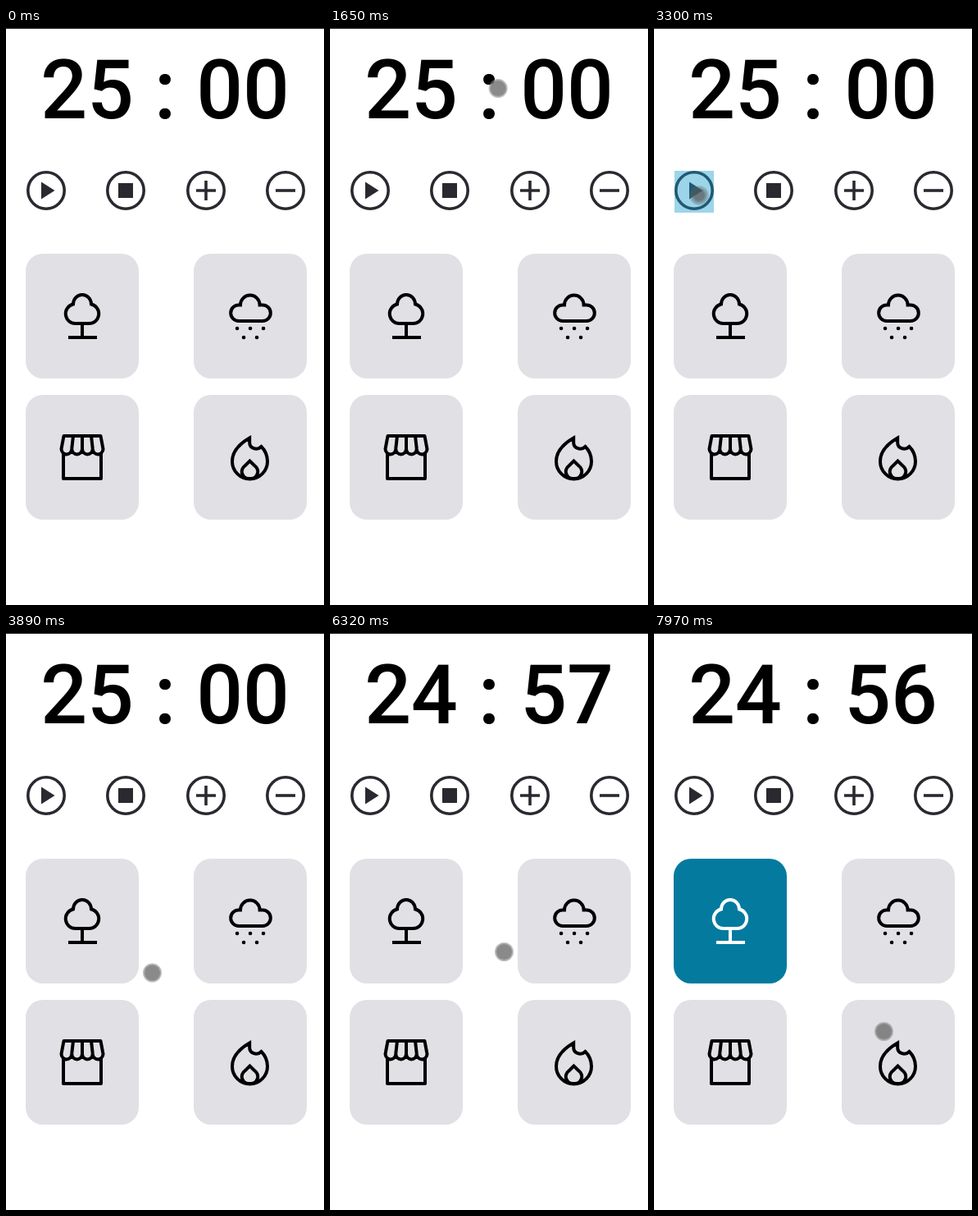
An HTML page that plays this animation: 388x703 px, repeating every 8000 ms.

```html
<!DOCTYPE html>
<html lang="en">
<head>
<meta charset="utf-8">
<title>Focus timer</title>
<style>
  html, body { margin: 0; width: 100%; height: 100%; overflow: hidden; background: #fff; }
  svg { display: block; width: 388px; height: 703px; }
  #clock { font: 500 100px Roboto, sans-serif; text-anchor: middle; white-space: pre; }
  .buttons { color: #2a2930; stroke: currentColor; stroke-width: 3.6; fill: none; }
  .buttons .solid { fill: currentColor; stroke: none; }
  .tile { color: #000; }
  .tile rect { fill: #e1e0e5; width: 138px; height: 152px; rx: 21px; }
  .tile.active { color: #fff; }
  .tile.active rect { fill: #047a9f; }
  .icon { fill: none; stroke: currentColor; stroke-width: 4; }
  .drops { stroke: currentColor; stroke-width: 4.5; stroke-linecap: round; }
  .tap { fill: #149bcd; fill-opacity: .42; }
</style>
</head>
<body>
<svg viewBox="0 0 388 703">
  <defs>
    <radialGradient id="press">
      <stop offset=".5" stop-color="#555" stop-opacity=".72"/>
      <stop offset="1" stop-color="#666" stop-opacity=".2"/>
    </radialGradient>
  </defs>
  <rect width="388" height="1" fill="#222"/>
  <text id="clock" x="194" y="110">25 : 00</text>

  <g class="buttons">
    <circle cx="49" cy="198" r="22.2"/>
    <path class="solid" d="M43 187.5L59.5 198L43 208.5Z"/>
    <circle cx="146" cy="198" r="22.2"/>
    <path class="solid" d="M137 189h18v18h-18Z"/>
    <circle cx="244" cy="198" r="22.2"/>
    <path d="M232 198h24M244 186v24"/>
    <circle cx="341" cy="198" r="22.2"/>
    <path d="M329 198h24"/>
  </g>

  <g class="tile" id="forest">
    <rect x="24" y="275"/>
    <path class="icon" d="M85 360a11.9 11.9 0 0 1-3-23.5a11 11.5 0 0 1 22 0a11.9 11.9 0 0 1-3 23.5ZM93 360v17M76 377h35"/>
  </g>
  <g class="tile">
    <rect x="229" y="275"/>
    <path class="icon" d="M284 357a9.8 9.8 0 0 1 0-19.6h2a11.8 11.8 0 0 1 23.6 0h3.4a9.8 9.8 0 0 1 0 19.6Z"/>
    <path class="drops" d="M282 366h.1M298 366h.1M314 366h.1M290 377h.1M306 377h.1"/>
  </g>
  <g class="tile">
    <rect x="24" y="447"/>
    <path class="icon" stroke-linejoin="round" d="M70 519V549H116V519M70.5 497H115.5L118.5 513a6.4 7 0 0 1-12.75 0a6.4 7 0 0 1-12.75 0a6.4 7 0 0 1-12.75 0a6.4 7 0 0 1-12.75 0ZM82 497L80.2 513M93 497v16M104 497l1.8 16"/>
  </g>
  <g class="tile">
    <rect x="229" y="447"/>
    <path class="icon" d="M297.2 499.5C286 506 276 516 276 528A21.5 21.5 0 0 0 319 528C319 521 316 514.5 311.5 510C306 515.5 297.2 512 297.2 505ZM297.5 527.5L291.5 533.4A8.6 8.6 0 0 0 297.5 549A8.6 8.6 0 0 0 303.5 533.4Z"/>
  </g>

  <rect class="tap" id="playTap" x="25" y="174" width="48" height="51"/>
  <rect class="tap" id="forestTap" x="24" y="275" width="138" height="152"/>
  <g id="pointer">
    <g id="hover">
      <circle r="10.5" fill="#6e6e6e" fill-opacity=".35" stroke="#8c8c8c" stroke-opacity=".55" stroke-width="2"/>
      <circle r="9.5" fill="#6e6e6e" fill-opacity=".7"/>
    </g>
    <circle id="pressed" r="12" fill="url(#press)"/>
  </g>
</svg>
<script>
const LOOP = 8000, REFRESH = 65.8;
const APPEAR = 800, TIMER_START = 3262, SECOND = 1005;
const $ = id => document.getElementById(id);

// Each move is a Bezier from where the pointer rests: start, end, controls, goal.
const HOME = [310, 664];
const moves = [
  [800, 1787, [55, 228], [193, 40], [221, 76]],
  [2116, 2510, [235, 76], [295, 125], [293, 150]],
  [2510, 3037, [255, 200], [60, 220], [55, 204]],
  [3432, 3826, [60, 235], [140, 385], [178.5, 414]],
  [4880, 5143, [185, 414], [206, 393], [212.5, 392.5]],
  [5340, 5932, [212.5, 392], [212.5, 390], [212.5, 388.5]],
  [6722, 7314, [200, 430], [140, 445], [121, 374]],
  [7774, 7972, [121, 380], [150, 460], [280.5, 485.5]]
];

const bezier = (a, b, c, d, u) => {
  const v = 1 - u;
  return v * v * v * a + 3 * v * v * u * b + 3 * v * u * u * c + u * u * u * d;
};

function pointerAt(time) {
  let from = HOME;
  for (const [start, end, c1, c2, to] of moves) {
    if (time < start) break;
    const u = Math.min(1, (time - start) / (end - start));
    from = [0, 1].map(i => bezier(from[i], c1[i], c2[i], to[i], u));
  }
  return from;
}

function clockText(time) {
  const left = 25 * 60 - Math.max(0, Math.floor((time - TIMER_START) / SECOND));
  const pad = n => String(n).padStart(2, "0");
  return `${pad(Math.floor(left / 60))} : ${pad(left % 60)}`;
}

const show = (id, visible) => $(id).setAttribute("visibility", visible ? "visible" : "hidden");

function render(t) {
  // The screen is refreshed about 15 times a second.
  const time = APPEAR + Math.floor((t - APPEAR + 12) / REFRESH) * REFRESH;
  $("clock").textContent = clockText(time);
  $("pointer").setAttribute("transform", `translate(${pointerAt(time)})`);

  const playTap = time > 3230 && time < 3430;
  const forestTap = time > 7440 && time < 7640;
  const pressed = playTap || forestTap;
  show("playTap", playTap);
  show("forestTap", forestTap);
  show("hover", time >= APPEAR && !pressed);
  show("pressed", pressed);
  $("forest").classList.toggle("active", time > 7560);
}

const begin = performance.now();
function frame() {
  render((performance.now() - begin) % LOOP);
  requestAnimationFrame(frame);
}
frame();
</script>
</body>
</html>
```
